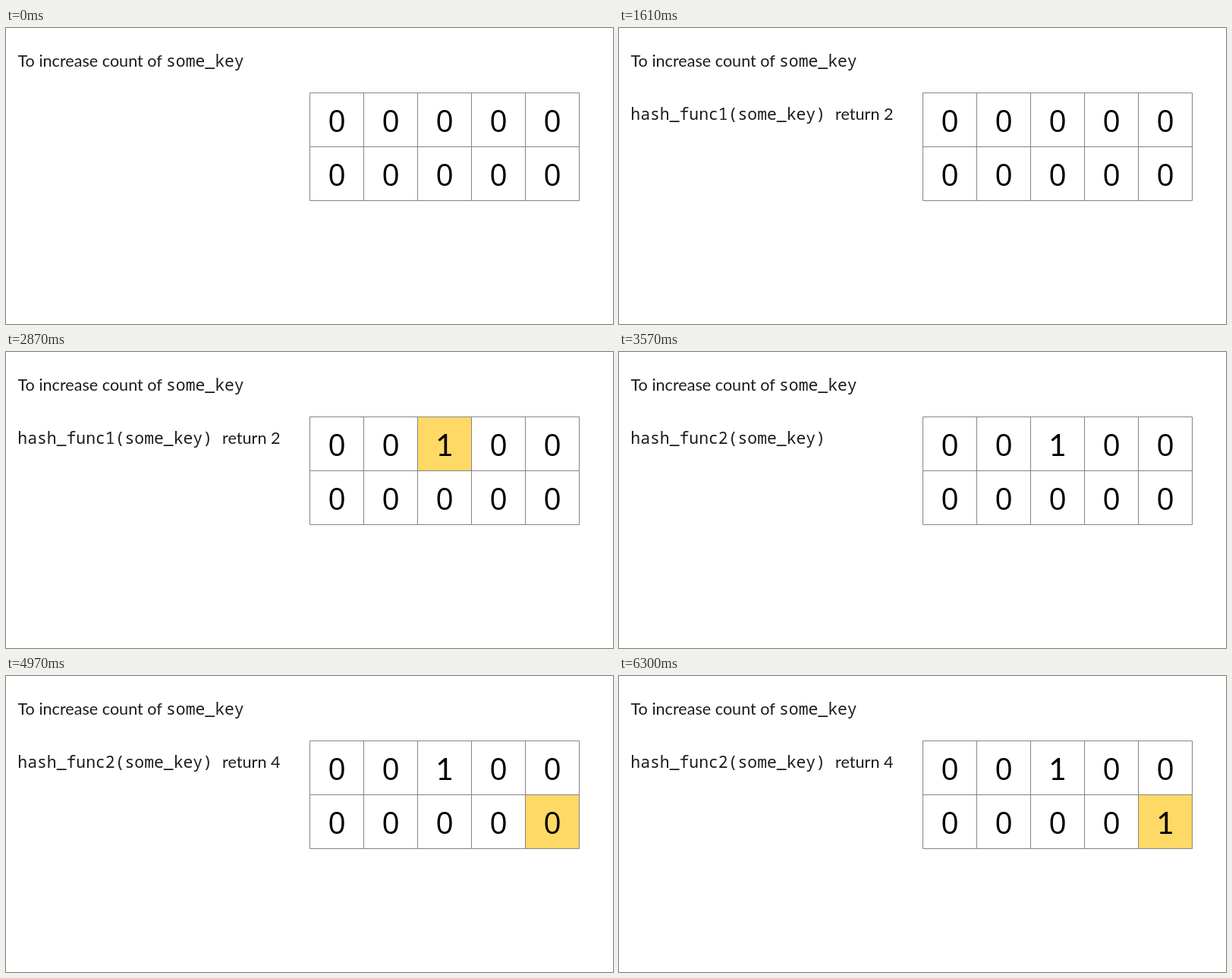
An HTML page that plays this animation: 800x390 px, repeating every 6370 ms.

```html
<!DOCTYPE html>
<html lang="en">
<head>
<meta charset="utf-8">
<title>Counting a key with two hash functions</title>
<style>
  html, body { margin: 0; width: 100%; height: 100%; overflow: hidden; background: #fff; }
  svg { display: block; width: 100%; height: 100%; }
  text { font: 21.6px Lato, sans-serif; fill: #1c1c1c; }
  .code { font: 21.4px "Noto Sans Mono", monospace; }
  .digits text { font: 40.5px "Open Sans", sans-serif; text-anchor: middle; fill: #000; }
  .digits .one { font-family: Lato, sans-serif; }
  .grid { fill: none; stroke: #858585; stroke-width: 1; }
  .mark { fill: #ffd966; }

  /* Hard cuts on one shared 6370 ms timeline */
  .step { animation: 6370ms step-end infinite; }
  .func1 { animation-name: func1; }
  .return2 { animation-name: return2; }
  .mark1 { animation-name: mark1; }
  .before1 { animation-name: before1; }
  .after1 { animation-name: after1; }
  .func2 { animation-name: func2; }
  .return4 { animation-name: return4; }
  .mark2 { animation-name: mark2; }
  .before2 { animation-name: before2; }
  .after2 { animation-name: after2; }

  @keyframes func1 { 0%, 52.74%, 100% { opacity: 0 } 9.88% { opacity: 1 } }
  @keyframes return2 { 0%, 52.74%, 100% { opacity: 0 } 15.38% { opacity: 1 } }
  @keyframes mark1 { 0%, 52.74%, 100% { opacity: 0 } 31.86% { opacity: 1 } }
  @keyframes before1 { 0% { opacity: 1 } 45.05%, 100% { opacity: 0 } }
  @keyframes after1 { 0% { opacity: 0 } 45.05%, 100% { opacity: 1 } }
  @keyframes func2 { 0% { opacity: 0 } 52.74%, 100% { opacity: 1 } }
  @keyframes return4 { 0% { opacity: 0 } 64.83%, 100% { opacity: 1 } }
  @keyframes mark2 { 0% { opacity: 0 } 78.02%, 100% { opacity: 1 } }
  @keyframes before2 { 0% { opacity: 1 } 97.8%, 100% { opacity: 0 } }
  @keyframes after2 { 0% { opacity: 0 } 97.8%, 100% { opacity: 1 } }
</style>
</head>
<body>
<svg viewBox="0 0 800 390">
  <text x="15.5" y="51">To increase count of</text>
  <text class="code" x="211" y="51">some_key</text>

  <text class="code step func1" x="15.3" y="121">hash_func1(some_key)</text>
  <text class="code step func2" x="15.3" y="121">hash_func2(some_key)</text>
  <text class="step return2" x="285" y="121">return 2</text>
  <text class="step return4" x="285" y="121">return 4</text>

  <rect class="mark step mark1" x="542" y="85" width="72" height="72"/>
  <rect class="mark step mark2" x="684" y="156" width="72" height="72"/>
  <path class="grid" d="M400.5 85.5h355v142h-355zM400.5 156.5h355M471.5 85.5v142M542.5 85.5v142M613.5 85.5v142M684.5 85.5v142"/>

  <g class="digits">
    <text x="436" y="137">0</text>
    <text x="507" y="137">0</text>
    <text class="step before1" x="578" y="137">0</text>
    <text class="one step after1" x="578" y="137">1</text>
    <text x="649" y="137">0</text>
    <text x="720" y="137">0</text>
    <text x="436" y="208">0</text>
    <text x="507" y="208">0</text>
    <text x="578" y="208">0</text>
    <text x="649" y="208">0</text>
    <text class="step before2" x="720" y="208">0</text>
    <text class="one step after2" x="720" y="208">1</text>
  </g>
</svg>
</body>
</html>
```
